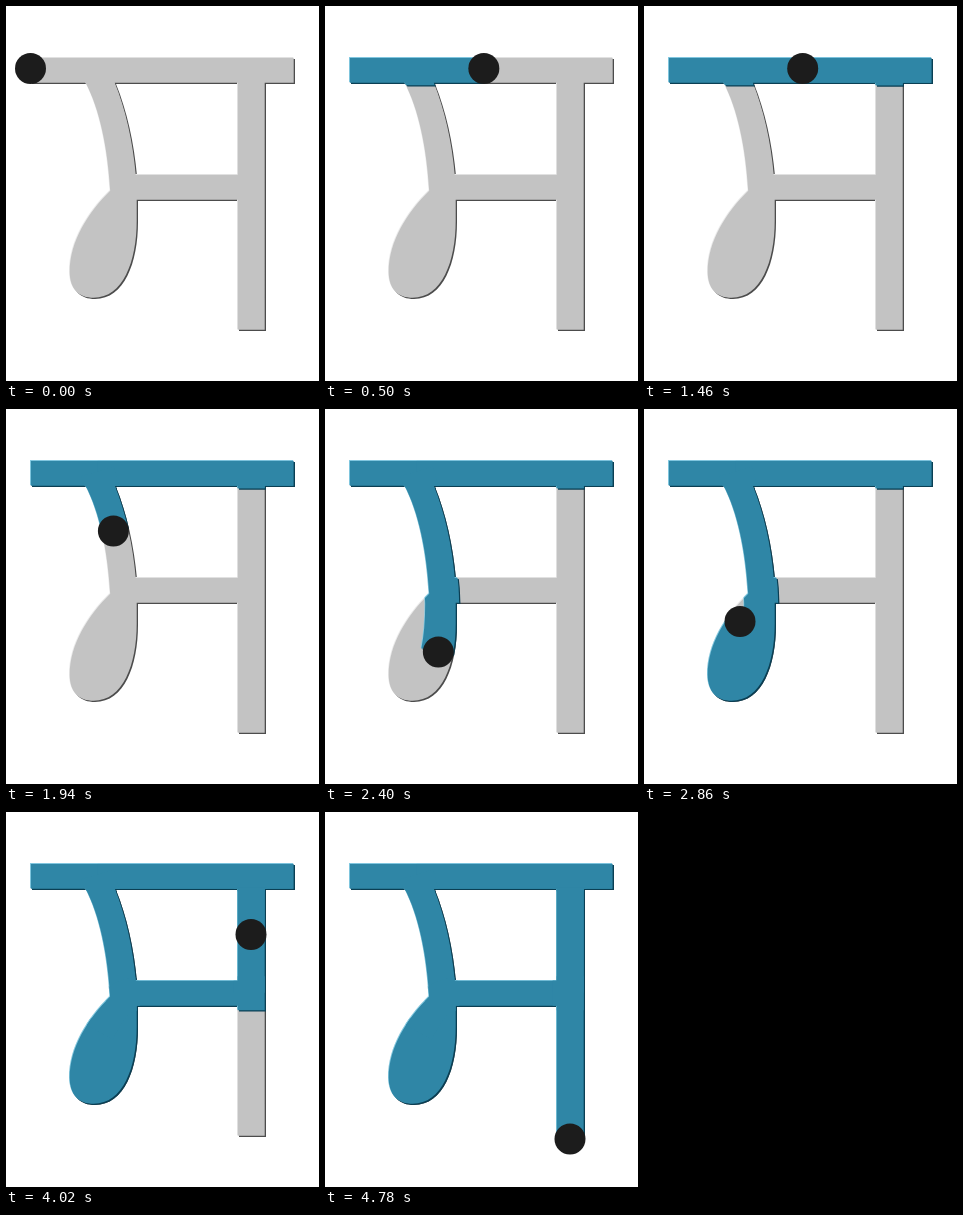
Recreate the animation shown at these times as an HTML page. Size 313x375 px, loop 4800 ms.

```html
<!DOCTYPE html>
<html lang="en">
<head>
<meta charset="utf-8">
<title>Letter stroke order</title>
<style>
  html, body { margin: 0; width: 100%; height: 100%; overflow: hidden; background: #fff; }
  svg { display: block; width: 313px; height: 375px; }
  #strokes { fill: none; stroke-width: 34; }
  .shade { transform: translate(1px, 1px); }
  .light { transform: translate(-1px, -1px); }
  .face { transform: translate(-.3px, -.3px); }
  .base .shade { fill: #4c4c4c; }
  .base .light { fill: #ebebeb; }
  .base .face { fill: #c3c3c3; }
  .ink .shade { stroke: #0b3f54; }
  .ink .light { stroke: #86cbe2; }
  .ink .face { stroke: #2f86a6; }
</style>
</head>
<body>
<svg viewBox="0 0 313 375">
  <defs>
    <path id="letter" clip-rule="evenodd" fill-rule="evenodd" d="M80 77 C94 104 102 142 104.5 185
      C82 207 64 236 64 266 C64 284 74 292 88 292 C117 292 131 256 131 215 V194
      H232 V324 H259 V77 H288 V52 H25 V77Z
      M109 77 C120 104 127 136 130 169 H232 V77Z"/>
    <clipPath id="shape"><use href="#letter" clip-rule="evenodd"/></clipPath>
    <g id="tracks"></g>
    <g id="strokes" clip-path="url(#shape)"></g>
  </defs>
  <g class="base">
    <use class="shade" href="#letter"/>
    <use class="light" href="#letter"/>
    <use class="face" href="#letter"/>
  </g>
  <g class="ink">
    <use class="shade" href="#strokes"/>
    <use class="light" href="#strokes"/>
    <use class="face" href="#strokes"/>
  </g>
  <circle id="pen" r="15.5" fill="#1c1c1c"/>
</svg>
<script>
  const LOOP = 4800, STEP = 20;
  const hook = '96 212.5 C108 191 116 181.5 138 181.5 H';

  // end time, pen track, inked stroke when it differs from the track
  const legs = [
    [980, 'M24.5 62.5 H287.8', 'M23 62.5 H290'],
    [1708, 'M287.8 62.5 H92'],
    [2860, 'M92 62.5 Q101 92 107.5 122.5 C112 146 117.5 168 117.5 195 C117.5 240 108 280 91 280 C80 280 78 262 82 246 C85 234 90 223 96 212.5'],
    [3455, 'M' + hook + 245, 'M92 219.5 L' + hook + 260.5],
    [3846, 'M245 181 V75.7'],
    [LOOP, 'M245 75.7 V332.3']
  ];

  const byId = id => document.getElementById(id);
  const pen = byId('pen');

  function addPath(parent, d) {
    const path = document.createElementNS('http://www.w3.org/2000/svg', 'path');
    path.setAttribute('d', d);
    parent.append(path);
    return path;
  }

  let start = 0;
  const parts = legs.map(([end, track, stroke = track]) => {
    const path = addPath(byId('tracks'), track);
    const ink = addPath(byId('strokes'), stroke);
    const part = { start, end, path, ink, length: path.getTotalLength(), inkLength: ink.getTotalLength() };
    start = end;
    return part;
  });

  function draw(time) {
    for (const { start, end, path, ink, length, inkLength } of parts) {
      const p = Math.min(1, Math.max(0, (time - start) / (end - start)));
      ink.setAttribute('visibility', p > 0 ? 'visible' : 'hidden');
      ink.setAttribute('stroke-dasharray', `${p * inkLength + (p === 1 ? 1 : 0)} 2000`);
      if (time >= start && time < end) {
        const { x, y } = path.getPointAtLength(p * length);
        pen.setAttribute('cx', x);
        pen.setAttribute('cy', y);
      }
    }
  }

  let origin;
  function tick(now) {
    origin ??= now;
    const time = Math.max(0, now - origin) % LOOP;
    draw(Math.floor(time / STEP) * STEP);
    requestAnimationFrame(tick);
  }
  draw(0);
  requestAnimationFrame(tick);
</script>
</body>
</html>
```
